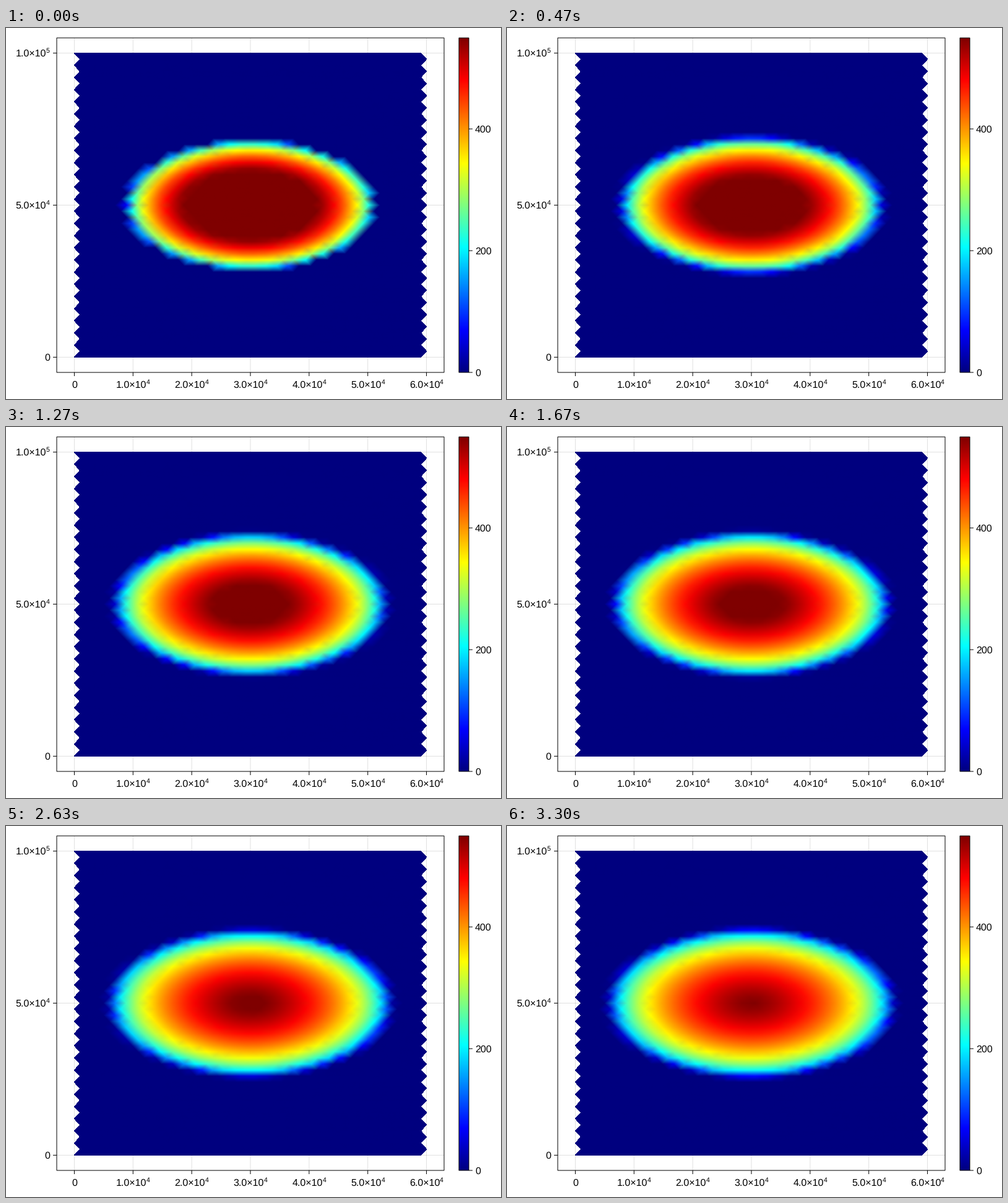
Write a matplotlib script that moves like this. It is 800 by 600 pixels and loops after 3.33 s.

```python
import numpy as np
import matplotlib.pyplot as plt
from matplotlib.animation import FuncAnimation
from matplotlib.colors import LinearSegmentedColormap
from matplotlib.patches import Rectangle
from matplotlib.tri import Triangulation

W, H, DPI = 800, 600, 100
FRAMES, LOOP_MS = 100, 3330
LEFT, RIGHT, TOP, BOTTOM = 82, 708, 16, 557
LX, LY = 60e3, 100e3
COLS, ROWS = 31, 51
H0, R0 = 707.1, 21213.2      # dome height and radius, m
END_TIME = 9.64              # in units of the dome's own time scale
SUBSTEPS = 30
VMAX = 549.5

plt.rcParams["font.family"] = "Liberation Sans"
plt.rcParams["text.hinting"] = "none"
jet = LinearSegmentedColormap.from_list(
    "jet9", ["#00007f", "#0000ff", "#007fff", "#00ffff", "#7fff7f",
             "#ffff00", "#ff7f00", "#ff0000", "#7f0000"], N=1024)


def px(x):
    return LEFT + (RIGHT - LEFT) * (x / LX + 0.05) / 1.1


def py(y):
    return BOTTOM - (BOTTOM - TOP) * (y / LY + 0.05) / 1.1


def build_mesh():
    """Rows of nodes, every second row shifted by half a cell."""
    dx, dy = LX / (COLS - 0.5), LY / (ROWS - 1)
    j, i = np.mgrid[:ROWS, :COLS]
    x = dx * (i + 0.5 * (j % 2))
    y = dy * j
    tris = []
    for r in range(ROWS - 1):
        for c in range(COLS - 1):
            a, b = r * COLS + c, (r + 1) * COLS + c
            if r % 2 == 0:
                tris += [(a, a + 1, b), (a + 1, b + 1, b)]
            else:
                tris += [(a, b + 1, b), (a, a + 1, b + 1)]
    return x.ravel(), y.ravel(), np.array(tris)


def edge_normals(tx, ty):
    """Per-corner edge normals and twice the signed area of each triangle."""
    nx = np.roll(ty, -1, 1) - np.roll(ty, -2, 1)
    ny = np.roll(tx, -2, 1) - np.roll(tx, -1, 1)
    return nx, ny, nx[:, 0] * ny[:, 1] - nx[:, 1] * ny[:, 0]


def spread(x, y, tris):
    """Thin-ice flow with linear elements; returns thickness per frame."""
    r = np.hypot(x - LX / 2, y - LY / 2) / R0
    h = H0 * np.clip(1 - r ** (4 / 3), 0, None) ** (3 / 7)
    gamma = (7 / 4) ** 3 * R0 ** 4 / H0 ** 7 / 18
    dt = (END_TIME - 1) / (FRAMES - 1) / SUBSTEPS

    nx, ny, twice = edge_normals(x[tris], y[tris])
    bx, by = nx / twice[:, None], ny / twice[:, None]
    area = np.abs(twice) / 2
    flat = tris.ravel()
    mass = np.bincount(flat, np.repeat(area / 3, 3))
    quad = np.full((3, 3), 1 / 6) + np.eye(3) / 2

    history = [h]
    for _ in range(FRAMES - 1):
        for _ in range(SUBSTEPS):
            ht = h[tris]
            gx, gy = (ht * bx).sum(1), (ht * by).sum(1)
            h5 = ((ht @ quad) ** 5).mean(1)
            flow = area * gamma * h5 * (gx ** 2 + gy ** 2)
            out = flow[:, None] * (gx[:, None] * bx + gy[:, None] * by)
            h = np.maximum(h - dt * np.bincount(flat, out.ravel()) / mass, 0)
        history.append(h)
    return history


nodes_x, nodes_y, cells = build_mesh()
thickness = spread(nodes_x, nodes_y, cells)

X0, X1, Y0, Y1 = 109, 681, 39, 534


def pixel_weights():
    """Triangle corners and barycentric weights for each pixel touched."""
    x, y = px(nodes_x), py(nodes_y)
    find = Triangulation(x, y, cells).get_trifinder()
    gx, gy = np.meshgrid(np.arange(X0, X1) + 0.5, np.arange(Y0, Y1) + 0.5)
    owner = find(gx, gy)
    for ox in (-0.49, 0.49):
        for oy in (-0.49, 0.49):
            owner = np.where(owner < 0, find(gx + ox, gy + oy), owner)
    inside = owner >= 0
    tris = cells[owner[inside]]
    tx, ty = x[tris], y[tris]
    nx, ny, twice = edge_normals(tx, ty)
    dx = gx[inside][:, None] - np.roll(tx, -1, 1)
    dy = gy[inside][:, None] - np.roll(ty, -1, 1)
    return inside, tris, (nx * dx + ny * dy) / twice[:, None]


inside, corners, weights = pixel_weights()


def picture(n):
    colors = jet(thickness[n] / VMAX)[:, :3]
    rgba = np.zeros(inside.shape + (4,))
    rgb = sum(colors[corners[:, k]] * weights[:, k, None] for k in range(3))
    rgba[inside, :3] = np.clip(rgb, 0, 1)
    rgba[inside, 3] = 1
    return rgba


fig = plt.figure(figsize=(W / DPI, H / DPI), dpi=DPI, facecolor="white")
ax = fig.add_axes([0, 0, 1, 1])
PT = 72 / DPI
FONT = 16


def line(xs, ys, color="black", z=4):
    ax.plot(xs, ys, color=color, lw=PT, zorder=z, solid_capstyle="butt", snap=False)


def label(x, base, text, sup="", ha="center"):
    shift = {"center": 3, "right": 6, "left": 0}[ha] if sup else 0
    t = ax.text(x - shift, base, text, fontsize=FONT * PT, ha=ha, va="baseline")
    if sup:
        ax.annotate(sup, (1, base), xycoords=(t, "data"), xytext=(0, 6 * PT),
                    textcoords="offset points", fontsize=0.66 * FONT * PT,
                    ha="left", va="baseline", annotation_clip=False)


GRID = (0, 0, 0, 0.12)
for k in range(7):
    x = px(k * 1e4)
    line([x, x], [TOP, BOTTOM], GRID, 1)
    line([x, x], [BOTTOM, BOTTOM + 6])
    label(x, 581.5, f"{k}.0×10" if k else "0", "4" if k else "")
for y, text, sup in [(0, "0", ""), (5e4, "5.0×10", "4"), (1e5, "1.0×10", "5")]:
    y = py(y)
    line([LEFT, RIGHT], [y, y], GRID, 1)
    line([LEFT - 6, LEFT], [y, y])
    label(71, y + 5.7, text, sup, "right")

image = ax.imshow(picture(0), zorder=2, extent=(X0, X1, Y1, Y0),
                  interpolation="nearest", aspect="auto")

BAR_L, BAR_R = 732, 748
ramp = np.linspace(1, 0, BOTTOM - TOP)[:, None]
ax.imshow(ramp, cmap=jet, vmin=0, vmax=1, zorder=2, aspect="auto",
          extent=(BAR_L, BAR_R, BOTTOM, TOP), interpolation="nearest")
for v in (0, 200, 400):
    y = BOTTOM - (BOTTOM - TOP) * v / VMAX
    line([BAR_R, BAR_R + 6], [y, y])
    label(758, y + 5.7, str(v), ha="left")

for l, r in ((LEFT, RIGHT), (BAR_L, BAR_R)):
    ax.add_patch(Rectangle((l, TOP), r - l, BOTTOM - TOP, fill=False,
                           ec="black", lw=PT, zorder=5, snap=False))

ax.set_xlim(0, W)
ax.set_ylim(H, 0)
ax.axis("off")


def update(n):
    image.set_data(picture(n))
    return (image,)


anim = FuncAnimation(fig, update, frames=FRAMES, interval=LOOP_MS / FRAMES,
                     repeat=True, repeat_delay=0)
plt.show()
```
